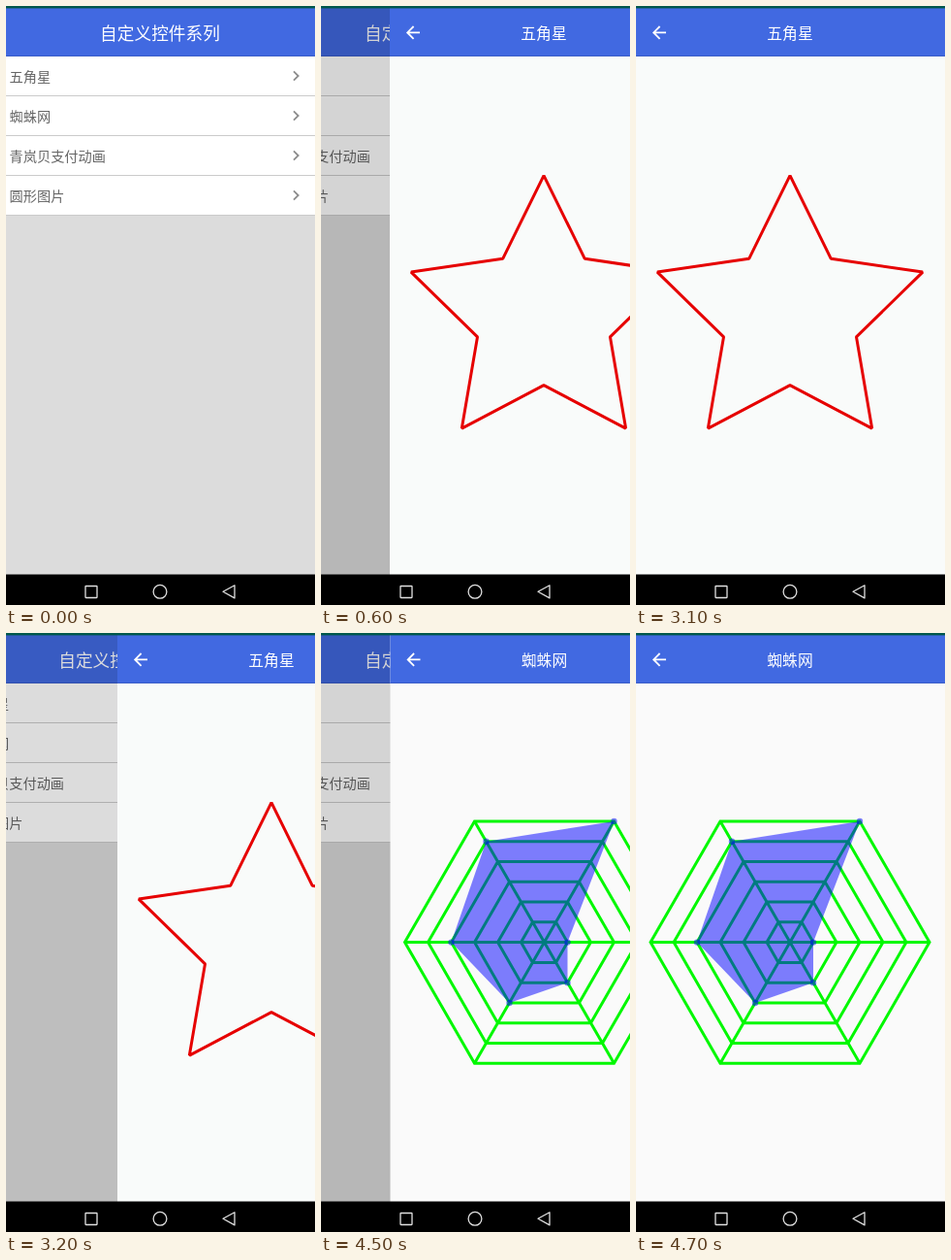
These frames come from a looping animation (319x617 px, 8 s). An HTML page:

```html
<!DOCTYPE html>
<html lang="zh-CN">
<head>
<meta charset="utf-8">
<title>自定义控件系列</title>
<style>
html, body { margin: 0; width: 100%; height: 100%; overflow: hidden; background: #000; }
svg { display: block; width: 100vw; height: 100vh; }
text { font-family: "Noto Sans CJK SC", "Noto Sans CJK", sans-serif; }
.title { fill: #fff; text-anchor: middle; }
.line { fill: none; }
</style>
</head>
<body>
<svg id="stage" viewBox="0 0 319 617">
  <g id="menu"></g>
  <g id="star"></g>
  <g id="web"></g>
  <rect width="319" height="2.4" fill="#00574b"/>
  <rect y="585.5" width="319" height="31.5"/>
  <g class="line" stroke="#e0e0e0" stroke-width="1.3">
    <rect x="82" y="597.5" width="12" height="12" rx=".5"/>
    <circle cx="159" cy="603.3" r="6.9"/>
    <path d="M224 603.3L236 596.7V609.9Z" stroke-linejoin="round"/>
  </g>
</svg>
<script>
const W = 319, LOOP = 8000, CX = 159, CY = 318.6, R = 144;
const PARALLAX = 67, SHADE = 0.215;
const $ = id => document.getElementById(id);

const polar = (deg, r) => {
  const a = deg * Math.PI / 180;
  return [CX + r * Math.cos(a), CY + r * Math.sin(a)];
};
const closed = pts => 'M' + pts.map(p => p.map(v => v.toFixed(2)).join(' ')).join('L') + 'Z';
const range = n => [...Array(n).keys()];

const bar = (title, size) => `
  <rect width="${W}" height="52" fill="#4169e1"/>
  <rect y="51" width="${W}" height="1" fill="#3a5dc8"/>
  <text class="title" x="${CX}" y="${28 + size * 0.38}" font-size="${size}">${title}</text>`;

const page = (title, bg, body) => `
  <rect width="${W}" height="586" fill="${bg}"/>${bar(title, 15.8)}
  <path class="line" d="M31 27.4H18.5M24.6 21L18.2 27.4L24.6 33.8" stroke="#fff" stroke-width="1.8"/>
  ${body}`;

const row = (label, i) => {
  const y = 52 + 41 * i;
  return `<rect y="${y}" width="${W}" height="40" fill="#fff"/>
    <rect y="${y + 40}" width="${W}" height="1" fill="#cbcbcb"/>
    <text x="3.6" y="${y + 26}" font-size="14.2" fill="#666">${label}</text>
    <path class="line" d="M297 ${y + 15.3}l4.7 4.7l-4.7 4.7" stroke="#8c8c8c" stroke-width="1.8"/>`;
};

const labels = ['五角星', '蜘蛛网', '青岚贝支付动画', '圆形图片'];
$('menu').innerHTML = `<rect width="${W}" height="586" fill="#dcdcdc"/>
  ${bar('自定义控件系列', 17.7)}${labels.map(row).join('')}
  <rect id="shade" width="${W}" height="586" opacity="0"/>`;

const starPts = range(10).map(i => polar(i * 36 - 90, i % 2 ? R / 2 : R));
$('star').innerHTML = page(labels[0], '#f9fbfa',
  `<path class="line" d="${closed(starPts)}" stroke="#e60000" stroke-width="3" stroke-linejoin="bevel"/>`);

const rings = range(6).map(k => closed(range(6).map(i => polar(i * 60, R * (k + 1) / 6))));
const spokes = range(6).map(i => `M${CX} ${CY}L${polar(i * 60, R).join(' ')}`);
const values = [1, 2, 3, 4, 5, 6].map((v, i) => polar(i * 60, R * v / 6));
$('web').innerHTML = page(labels[1], '#fafafa', `
  <path class="line" d="${rings.join('')}${spokes.join('')}" stroke="#00f800" stroke-width="3"/>
  <g fill="#00f" fill-opacity=".5"><path d="${closed(values)}"/>
  ${values.map(([x, y]) => `<circle cx="${x}" cy="${y}" r="3.2"/>`).join('')}</g>`);

// [time, page, left edge of the page]
const steps = [
  [0, 'star', W],
  [500, 'star', 204], [600, 'star', 71], [700, 'star', 7], [800, 'star', 0],
  [3200, 'star', 115], [3300, 'star', 249], [3400, 'star', 314], [3500, 'star', W],
  [4500, 'web', 71.5], [4600, 'web', 7], [4700, 'web', 0]
];

function draw(t) {
  const [, name, x] = steps.filter(s => s[0] <= t).pop();
  const cover = 1 - x / W;
  for (const id of ['star', 'web']) {
    $(id).style.display = id === name && cover > 0 ? '' : 'none';
    $(id).setAttribute('transform', `translate(${x})`);
  }
  $('menu').setAttribute('transform', `translate(${-PARALLAX * cover})`);
  $('shade').setAttribute('opacity', SHADE * cover);
}

const start = performance.now();
function tick() {
  draw((performance.now() - start) % LOOP);
  requestAnimationFrame(tick);
}
tick();
</script>
</body>
</html>
```
